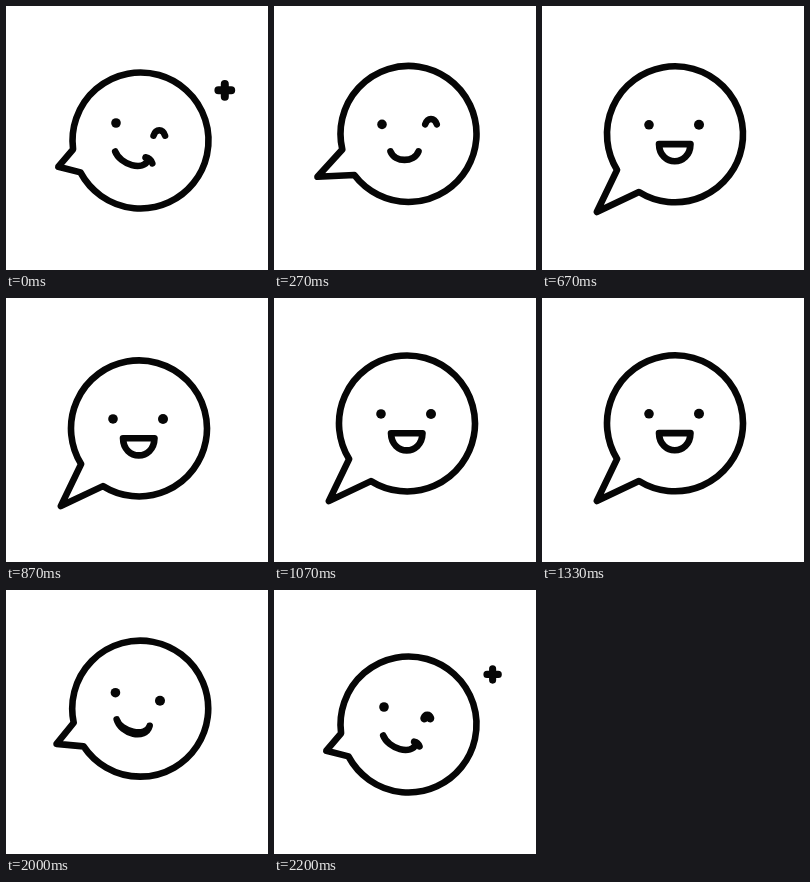
Animation, 262 px wide and 264 px high, one loop 2.27 s. Source, as an HTML page:

```html
<!DOCTYPE html>
<html lang="en">
<head>
<meta charset="utf-8">
<title>Winking speech bubble</title>
<style>
  html, body { margin: 0; width: 100%; height: 100%; overflow: hidden; background: #fff; }
  svg { display: block; width: 100%; height: 100%; }
  path { fill: none; stroke: #060606; stroke-width: 6.6; stroke-linecap: round; stroke-linejoin: round; }
  circle { fill: #060606; }
</style>
</head>
<body>
<svg viewBox="0 0 262 264">
  <path id="bubble"/>
  <g id="face">
    <circle id="leftEye"/>
    <path id="rightEye"/>
    <path id="mouth"/>
    <path id="cheek"/>
  </g>
  <path id="plus" d="M-6.4 0H6.4M0 -6.4V6.4" style="stroke-width:8"/>
</svg>
<script>
const LOOP = 2270, STEP = 200 / 3, RADIUS = 68;
const el = id => document.getElementById(id);
const mix = (a, b, u) => a + (b - a) * u;

function set(id, attrs) {
  for (const k in attrs) el(id).setAttribute(k, attrs[k]);
}

// Eased 0 to 1 between two times.
function ramp(t, from, to) {
  const u = Math.min(1, Math.max(0, (t - from) / (to - from)));
  return u * u * (3 - 2 * u);
}

// Face coordinates are relative to the bubble centre.
const wink = { cx: 134.5, angle: 162.3, half: 10.3, length: 86.2, lx: -24.5, ly: -17.5, rx: 18.8, ry: -7.6,
               x0: -25.3, y0: 11, x1: 8, y1: 18.8, inset: 5, depth: 13, open: 0 };
const smile = { cx: 134.5, angle: 154.8, half: 12, length: 100.6, lx: -26.5, ly: -9.5, rx: 22.5, ry: -12.4,
                x0: -18, y0: 17.5, x1: 10, y1: 17.5, inset: 4.5, depth: 11.3, open: 0 };
const laugh = { cx: 133, angle: 135.2, half: 13.2, length: 110.2, lx: -26, ly: -9.5, rx: 24, ry: -9.5,
                x0: -16, y0: 9.8, x1: 15.5, y1: 9.8, inset: 0.5, depth: 22.8, open: 1 };

function poseAt(t) {
  const toSmile = ramp(t, 50, 270), toLaugh = ramp(t, 320, 500), back = ramp(t, 1740, 2100);
  const pose = {};
  for (const k in wink) pose[k] = mix(mix(mix(wink[k], smile[k], toSmile), laugh[k], toLaugh), wink[k], back);
  return pose;
}

// Rise, two slow bobs, a hop and the landing.
function heightAt(t) {
  const bob = ramp(t, 490, 790) - ramp(t, 850, 1140) + ramp(t, 1260, 1580);
  return 134.5 - 10 * ramp(t, 30, 420) + 6 * bob - 15 * ramp(t, 1700, 1930) + 19 * ramp(t, 1930, 2200);
}

function drawBubble(p, cy) {
  const polar = (deg, r) => {
    const a = deg * Math.PI / 180;
    return [p.cx + r * Math.cos(a), cy + r * Math.sin(a)];
  };
  set('bubble', { d: `M${polar(p.angle + p.half, RADIUS)}A${RADIUS} ${RADIUS} 0 1 1 ` +
    `${polar(p.angle - p.half, RADIUS)}L${polar(p.angle, p.length)}Z` });
  set('face', { transform: `translate(${p.cx} ${cy})` });
}

function drawEyes(p, shut) {
  set('leftEye', { cx: p.lx, cy: p.ly, r: 4.8 });
  const w = Math.max(0.01, 5.8 * shut), y = p.ry + 2.8 * shut, top = y - 7.2 * shut;
  set('rightEye', { d: `M${p.rx - w} ${y}C${p.rx - w * 0.6} ${top} ${p.rx + w * 0.6} ${top} ${p.rx + w} ${y}` });
  el('rightEye').style.strokeWidth = mix(10, 6.5, shut);
}

// The upper lip follows the lower one until the mouth opens.
function drawMouth(p, cheek) {
  const { x0, y0, x1, y1, inset, depth } = p;
  const curve = (xa, ya, xb, yb, k) => {
    const dx = Math.sign(xb - xa) * inset;
    return `C${xa + dx * k} ${ya + depth * k} ${xb - dx * k} ${yb + depth * k} ${xb} ${yb}`;
  };
  set('mouth', { d: `M${x0} ${y0}${curve(x0, y0, x1, y1, 1)}${curve(x1, y1, x0, y0, 1 - p.open)}Z` });
  set('cheek', {
    d: `M${x1 - 3 * cheek} ${y1 - 2 * cheek}q${5 * cheek} ${cheek} ${6.8 * cheek} ${6 * cheek}`,
    visibility: cheek ? 'visible' : 'hidden'
  });
}

function drawPlus(size) {
  const near = (1 - size) ** 2;
  set('plus', {
    transform: `translate(${218.8 - 14 * near} ${84.3 + 9 * near}) scale(${size})`,
    visibility: size ? 'visible' : 'hidden'
  });
}

function draw(t) {
  const p = poseAt(t);
  drawBubble(p, heightAt(t));
  drawEyes(p, 1 - ramp(t, 290, 460) + ramp(t, 2130, LOOP));
  drawMouth(p, 1 - ramp(t, 60, 210) + ramp(t, 2080, 2250));
  drawPlus(1 - ramp(t, 60, 200) + ramp(t, 2050, 2240));
}

const origin = performance.now();
function tick(now) {
  const t = Math.max(0, now - origin) % LOOP;
  draw(Math.min(33, Math.floor((t + 4) / STEP)) * STEP);
  requestAnimationFrame(tick);
}
draw(0);
requestAnimationFrame(tick);
</script>
</body>
</html>
```
